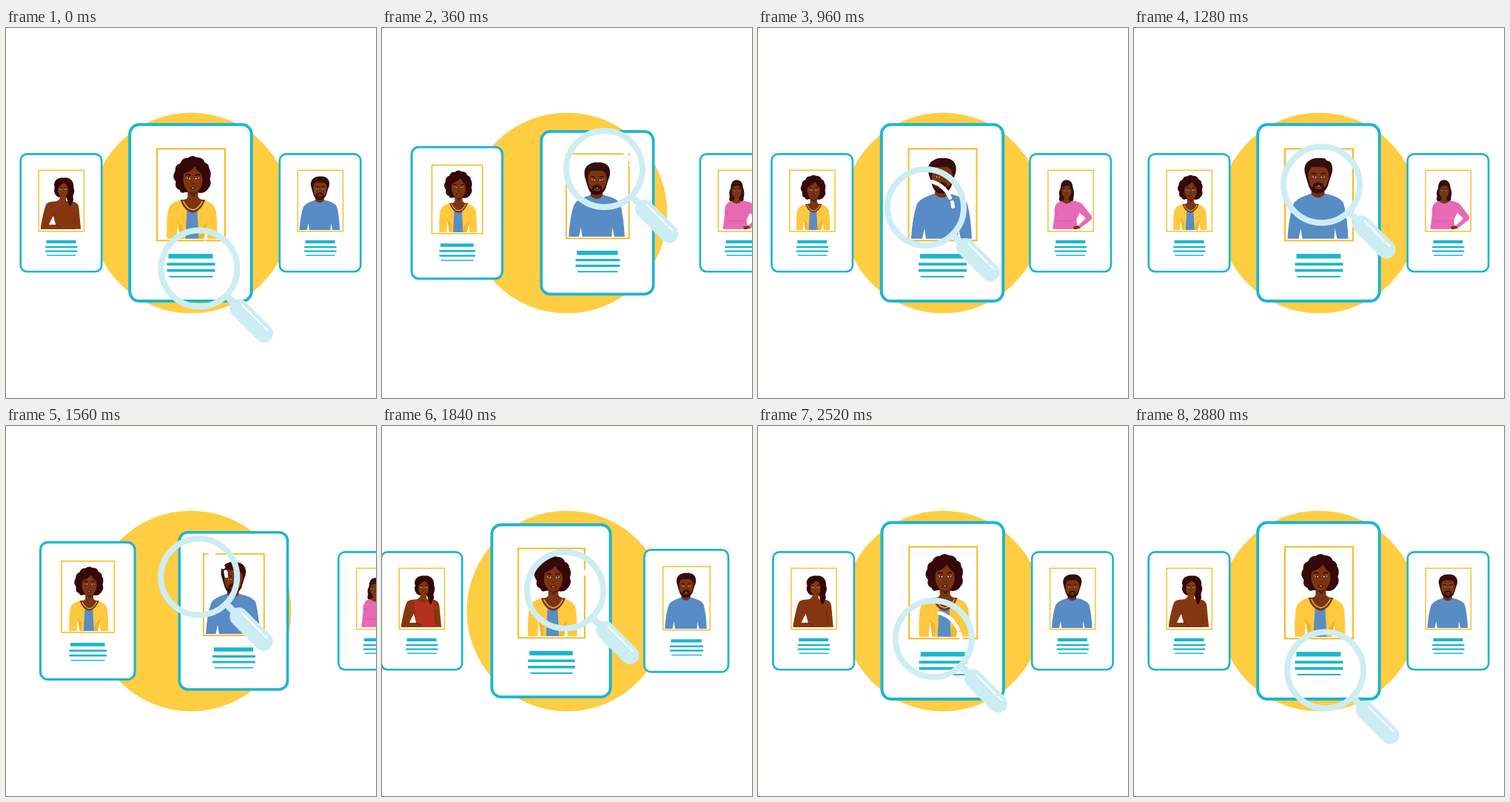
Write an HTML page that moves like this. It is 500 px wide and 500 px high and loops after 2920 ms.

```html
<!DOCTYPE html>
<html lang="en">
<head>
<meta charset="utf-8">
<title>Candidate search</title>
<style>
  html, body { margin: 0; width: 100%; height: 100%; overflow: hidden; background: #fff; }
  svg { display: block; width: 100vw; height: 100vh; }
</style>
</head>
<body>
<svg viewBox="0 0 500 500">
  <defs>
    <g id="frame">
      <rect x="-82.2" y="-119.3" width="164.400" height="238.600" rx="13" fill="#fff" stroke="#1cb5d0" stroke-width="4"/>
      <rect x="-45.5" y="-86.5" width="92" height="124" fill="#fff" stroke="#f9b820" stroke-width="2"/>
      <path fill="#1cb5d0" d="M-30 55.500h60v6.300h-60zM-32 67.500h65v3.600h-65zM-32 76h65v3.600h-65zM-29 85.300h59v2h-59z"/>
    </g>
    <g id="face">
      <path fill="none" stroke="#35080a" stroke-width="1.500" d="M-10-6Q-6-8-3-5M10-6Q6-8 3-5"/>
      <path fill="#fff" d="M-9-2Q-6-4-3-1Q-6 0-9-2ZM9-2Q6-4 3-1Q6 0 9-2Z"/>
      <path stroke="#250805" stroke-width="2.300" stroke-linecap="round" d="M-6-2h.1M6-2h.1"/>
      <path fill="none" stroke="#4d1b0b" d="M-2 5Q0 7 2 5"/>
      <path fill="#3a0b0d" d="M-4 11Q0 8 4 11Q0 16-4 11Z"/>
      <path fill="#fff" d="M-2 11H2L1 12H-1Z"/>
    </g>
  </defs>
  <circle cx="250" cy="250" r="135.500" fill="#ffcd42"/>

  <g class="card">
    <use href="#frame"/>
    <path fill="#35080a" d="M-13-51C-18-65-5-73 6-71C19-73 27-62 25-51C29-45 25-38 24-33C26-25 24-18 17-13C13-20 13-27 11-31L-6-32C-13-36-16-44-13-51Z"/>
    <g fill="#85380f">
      <path d="M-1-37H10V-25Q13-22 23-23Q35-21 36-10L40 33H-41V27Q-37 1-31-16Q-28-23-14-23Q-2-23-1-37Z"/>
      <ellipse cx="4" cy="-46" rx="10.500" ry="14.500"/>
      <path id="top" d="M-15-22L-9-23Q4-10 18-23L25-20L27 23L29 33H-12L-15 10Z"/>
      <path d="M-41 26L-12 22L0 28L-4 33H-41Z"/>
    </g>
    <path fill="#fff" d="M-25 24L-16 6L-11 24Z"/>
    <path fill="none" stroke="#4f210d" stroke-width=".8" d="M26-2L28 27M-15 0L-13 9M-13 25L2 29"/>
    <path fill="#35080a" d="M-9-52Q2-56 6-64Q12-55 17-49L18-63Q3-73-10-61ZM14-46Q24-41 22-27Q24-18 18-13Q11-20 14-46Z"/>
    <use href="#face" transform="translate(4 -46) scale(.85)"/>
  </g>

  <g class="card">
    <use href="#frame"/>
    <path fill="#35080a" d="M-14-67Q-11-75-4-74Q2-79 8-75Q17-75 19-68Q25-66 25-60Q29-54 26-46Q29-38 24-33Q20-26 12-27L-7-28Q-13-25-15-31Q-22-33-20-42Q-26-49-21-56Q-21-65-14-67Z"/>
    <path fill="#ffc83e" d="M-15-17L18-17Q31-14 34-4Q36 8 36 35H23L20 14L17 35H-13L-17 12L-19 35H-32Q-33 8-30-5Q-27-14-15-17Z"/>
    <path fill="#f0b62c" d="M-18 11L-10 20L-11 35H-14ZM23 12L13 23L11 35H18Z"/>
    <path fill="#5a8dc5" d="M-5-3H9L11 35H-7Z"/>
    <path fill="#7b3512" d="M-4-34H10V-22Q12-17 20-18Q14-2 3 0Q-9-2-14-18Q-4-17-4-22Z"/>
    <path fill="none" stroke="#f1bd52" stroke-width="1.500" d="M-10-16Q-5-5 3-4Q11-5 16-16"/>
    <path fill="#561f10" d="M-4-29H10L4-22Z"/>
    <ellipse cx="3" cy="-45" rx="13" ry="18" fill="#7b3512"/>
    <path fill="#35080a" d="M-13-46Q-14-52-4-55Q3-58 6-63Q8-57 15-52L17-43Q22-55 16-68L-5-71Q-19-63-13-46Z"/>
    <use href="#face" transform="translate(3 -45)"/>
  </g>

  <g class="card">
    <use href="#frame"/>
    <path fill="#588cc4" d="M-10-26L9-26Q31-21 34-12Q39 8 40 35H25L22 21L21 35H-22L-24 21L-27 35H-42Q-40 4-34-12Q-30-20-10-26Z"/>
    <path fill="#73310f" d="M-9-36H8V-25Q0-16-10-25Z"/>
    <path fill="#350d0b" d="M-17-48Q-22-62-15-69Q-8-75 1-74Q12-75 17-67Q21-59 16-48L12-35Q7-26-1-26Q-9-26-13-35Z"/>
    <path fill="#7b3512" d="M-14-48Q-14-60-8-62H7Q14-59 14-48L11-38L7-34L6-39Q0-43-7-39L-8-34L-12-38Z"/>
    <path fill="#7b3512" d="M-5-36Q0-39 5-36L3-32H-4Z"/>
    <use href="#face" transform="translate(0 -47) scale(.95)"/>
  </g>

  <g class="card">
    <use href="#frame"/>
    <path fill="#30120f" d="M-20-50Q-20-67-8-67Q4-67 5-51Q9-41 6-31Q7-25 2-21H-18Q-26-25-22-33Q-25-42-20-50Z"/>
    <path fill="#e869b4" d="M-19-24Q-8-16 3-24Q20-24 26-15L43 7Q45 14 37 18L19 32L13 29L31 11L19 0L12 14L14 33H-36L-32 2Q-35-19-19-24Z"/>
    <path fill="#7b3512" d="M-13-36H-3V-25L3-24Q-8-13-18-24L-13-26ZM5 28L16 26L20 31L8 34Z"/>
    <ellipse cx="-8" cy="-44" rx="10" ry="14" fill="#7b3512"/>
    <path fill="#30120f" d="M-20-42Q-18-62-8-66Q6-61 4-42Q0-51-3-55Q-14-56-17-49Z"/>
    <path fill="none" stroke="#c9509a" stroke-width=".8" d="M-28-5L-27 6M-27 15Q-10 20 12 14"/>
    <use href="#face" transform="translate(-8 -44) scale(.78)"/>
  </g>

  <g id="glass" fill="none" stroke="#cdedf4" stroke-linecap="round">
    <circle r="51.500" stroke-width="8"/>
    <path stroke-width="9" d="M38 38L52 52"/>
    <path stroke-width="25" d="M54 54L87.500 87.500"/>
    <path stroke="#fff" stroke-width="2" d="M58 49L84 75M87 78L92 83"/>
    <path stroke="#fff" stroke-width="5" d="M8-35Q26-30 33-13M36-7L37-1"/>
  </g>
</svg>

<script>
const LOOP = 2920, STEP = 40;
const GAP = 175, LEFT = 74.5, MIDDLE = 249.8, SIDE = 0.666;
const FORWARD = 80, BACK = 1445;

// Damped spring from 0 to 1 with a slight overshoot.
function spring(ms) {
  if (ms <= 0) return 0;
  const swing = 0.0043 * ms;
  return 1 - Math.exp(-0.0055 * ms) * (Math.cos(swing) + 0.8 * Math.sin(swing));
}

// Key points of the lens centre, joined into a closed smooth path.
const path = [
  { t: 0, x: 261, y: 325 },
  { t: 360, x: 300.5, y: 190.5 },
  { t: 960, x: 226.5, y: 242.5 },
  { t: 1440, x: 263, y: 201 },
  { t: 1840, x: 247.5, y: 222 },
  { t: 2200, x: 228.5, y: 258 },
  { t: 2800, x: 252, y: 317 },
  { t: 2880, x: 258.5, y: 330 },
];

function pointAt(i) {
  const n = path.length, p = path[(i + n) % n];
  return { ...p, t: p.t + Math.floor(i / n) * LOOP };
}

// Tangent that flattens at turning points, so the path never bulges.
function tangent(i, axis) {
  const [a, b, c] = [i - 1, i, i + 1].map(pointAt);
  const before = (b[axis] - a[axis]) / (b.t - a.t);
  const after = (c[axis] - b[axis]) / (c.t - b.t);
  return before * after <= 0 ? 0 : 2 * before * after / (before + after);
}

function lens(t, axis) {
  const i = path.findLastIndex(p => p.t <= t);
  const a = pointAt(i), b = pointAt(i + 1);
  const h = b.t - a.t, u = (t - a.t) / h, v = 1 - u;
  return a[axis] * v * v * (1 + 2 * u) + b[axis] * u * u * (3 - 2 * u)
    + h * u * v * (tangent(i, axis) * v - tangent(i + 1, axis) * u);
}

const cards = document.querySelectorAll('.card');
const glass = document.getElementById('glass');
const shirt = document.getElementById('top');
const place = (node, x, y, s = 1) =>
  node.setAttribute('transform', `translate(${x} ${y}) scale(${s})`);
const settle = e => Math.min(e, 1 + (e - 1) * 0.3);

function draw(t) {
  const turn = Math.min(1, spring(t - FORWARD)) - Math.min(1, spring(t - BACK));
  cards.forEach((card, i) => {
    // Cards follow one another; the one arriving in the middle overshoots least.
    const lag = Math.max(i, 1) - 2;
    let out = spring(t - FORWARD - 50 * lag);
    let back = spring(t - BACK + 40 * lag);
    if (i === 2) out = settle(out);
    if (i === 1) back = settle(back);
    const focus = i === 1 ? 1 - turn : i === 2 ? turn : 0;
    place(card, LEFT + GAP * (i - out + back), MIDDLE, SIDE + (1 - SIDE) * focus);
  });
  shirt.setAttribute('fill', t > FORWARD && t < 2140 ? '#b5301e' : '#85380f');
  place(glass, lens(t, 'x'), lens(t, 'y'));
}

const begin = performance.now();
function tick() {
  const t = (performance.now() - begin) % LOOP;
  draw(Math.floor(t / STEP) * STEP);
  requestAnimationFrame(tick);
}
tick();
</script>
</body>
</html>
```
